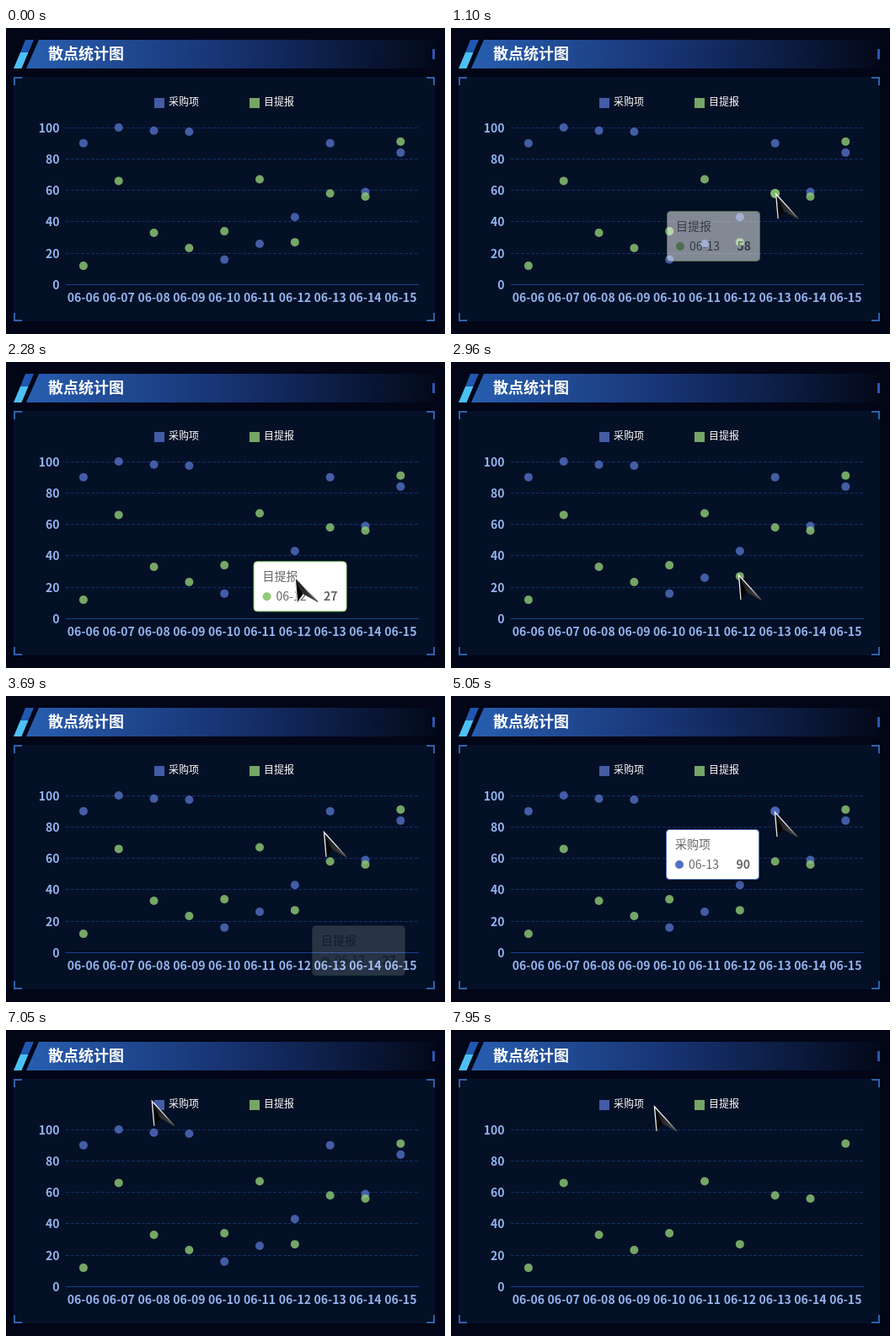
Write an HTML page that moves like this. It is 521 by 363 pixels and loops after 8000 ms.

```html
<!DOCTYPE html>
<html lang="zh">
<head>
<meta charset="utf-8">
<style>
  html, body { margin: 0; width: 100%; height: 100%; overflow: hidden; background: #020617; }
  svg { display: block; width: 521px; height: 363px; font-family: "Noto Sans CJK SC", "Noto Sans CJK", "Noto Sans", sans-serif; }
  .title { font: bold 18px "Noto Sans CJK SC", "Noto Sans CJK", sans-serif; fill: #fff; }
  .legend { font-size: 12px; fill: #fff; }
  .axis { font-size: 14px; font-weight: bold; fill: #94b5ef; }
  .tip { font-size: 14px; fill: #666; filter: drop-shadow(1px 2px 5px rgba(0,0,0,.2)); }
</style>
</head>
<body>
<svg viewBox="0 0 521 363">
  <defs>
    <linearGradient id="bar">
      <stop offset="0" stop-color="#285eb0"/>
      <stop offset=".5" stop-color="#173270"/>
      <stop offset="1" stop-color="#030919"/>
    </linearGradient>
    <linearGradient id="edge" x1="0" y1="0" x2="1" y2="1">
      <stop offset="0" stop-color="#fff"/>
      <stop offset=".55" stop-color="#ddd"/>
      <stop offset="1" stop-color="#444"/>
    </linearGradient>
    <linearGradient id="facet" x1="0" y1="0" x2="1" y2="1">
      <stop offset="0" stop-color="#0c0c0c"/>
      <stop offset="1" stop-color="#484848"/>
    </linearGradient>
  </defs>
  <path d="M23 14H33L26.5 29H17Z" fill="#2057b0"/>
  <path d="M17 29H26.5L18.5 48H9Z" fill="#4dc0f3"/>
  <path d="M39 14H509V48H24Z" fill="url(#bar)"/>
  <path d="M506 25h3v12h-3z" fill="#2c55b3"/>
  <text class="title" x="50" y="37">散点统计图</text>
  <path d="M9 58H509V348H9Z" fill="#041026"/>
  <path d="M10 68V59H19M499 59H508V68M508 338V347H499M19 347H10V338" fill="none" stroke="#2d62ac" stroke-width="2"/>
  <g id="chart"></g>
  <g id="tip" class="tip">
    <rect x=".5" y=".5" width="110" height="59" rx="4" fill="#fff"/>
    <text id="tipName" x="11" y="23"></text>
    <circle id="tipMark" cx="16" cy="42" r="5"/>
    <text id="tipDate" x="27" y="47"></text>
    <text id="tipValue" x="100" y="47" text-anchor="end" font-weight="bold"></text>
  </g>
  <g id="cursor">
    <path d="M0 0L3 31L10 21Z" fill="#050505"/>
    <path d="M0 0L10 21L28 31Z" fill="url(#facet)"/>
    <path d="M3 30L.5 .8L27 30" fill="none" stroke="url(#edge)" stroke-width="1.3"/>
  </g>
</svg>
<script>
const LOOP = 8000;
const $ = id => document.getElementById(id);
const chart = $('chart');
const series = [
  { name: '采购项', color: '#5470c6', legendX: 176, values: [90, 100, 98, 97.3, 16, 26, 43, 90, 59, 84] },
  { name: '目提报', color: '#91cc75', legendX: 289, values: [12, 66, 33, 23.3, 34, 67, 27, 58, 56, 91] }
];
const dates = series[0].values.map((_, i) => '06-' + String(i + 6).padStart(2, '0'));
const px = i => 71 + 41.82 * (i + .5);
const py = v => 304.5 - 1.865 * v;

function add(tag, attrs, text) {
  const el = document.createElementNS('http://www.w3.org/2000/svg', tag);
  set(el, attrs);
  if (text) el.textContent = text;
  return chart.appendChild(el);
}
function set(el, attrs) {
  for (const key in attrs) el.setAttribute(key, attrs[key]);
}

for (let v = 0; v <= 100; v += 20) {
  const y = Math.floor(py(v)) + .5;
  add('path', { d: `M71 ${y}H490`, stroke: v ? '#102f69' : '#1a4190', 'stroke-dasharray': v ? '4 2' : 'none' });
  add('text', { class: 'axis', x: 63.5, y: y + 5, 'text-anchor': 'end' }, String(v));
}
dates.forEach((d, i) => add('text', { class: 'axis', x: px(i), y: 325, 'text-anchor': 'middle' }, d));
for (const s of series) {
  add('rect', { x: s.legendX, y: 83, width: 12, height: 12, fill: s.color, opacity: .8 });
  add('text', { class: 'legend', x: s.legendX + 17, y: 92 }, s.name);
  s.dots = s.values.map((v, i) => add('circle', { cx: px(i), cy: py(v), fill: s.color }));
}

// Cursor tip: time, x, y
const path = [
  [130, 232, 284], [450, 310, 215], [750, 386, 144], [960, 385, 196], [1730, 386, 197],
  [1930, 366, 208], [2240, 343, 254], [2560, 340, 256], [2760, 311, 262], [2960, 341, 252],
  [3450, 341, 252], [3690, 377, 161], [4030, 384, 137], [5380, 384, 137], [5900, 94, 204],
  [6160, 121, 196], [6980, 173, 84], [7810, 171, 79], [7950, 241, 90], [LOOP, 241, 90]
];
// Tooltips: shown from start to end; each glides from the previous place
const tips = [
  { start: 1000, end: 2240, s: 1, i: 7, x: 256, y: 217 },
  { start: 2240, end: 2700, s: 1, i: 6, x: 363, y: 272 },
  { start: 3050, end: 3520, s: 1, i: 6, x: 363, y: 272 },
  { start: 4560, end: 5480, s: 0, i: 7, x: 255, y: 158 }
];
const FADE = 200, GLIDE = 400;
const clamp = x => Math.max(0, Math.min(1, x));
const mix = (a, b, k) => a + (b - a) * k;

function drawCursor(t) {
  const n = path.findIndex(p => p[0] > t);
  $('cursor').style.display = n > 0 ? '' : 'none';
  if (n < 1) return;
  const [t0, x0, y0] = path[n - 1], [t1, x1, y1] = path[n];
  const k = (t - t0) / (t1 - t0);
  set($('cursor'), { transform: `translate(${mix(x0, x1, k)} ${mix(y0, y1, k)})` });
}

function drawTip(t) {
  const n = tips.findLastIndex(tip => tip.start <= t);
  const tip = tips[n], prev = tips[n - 1] || tip;
  $('tip').style.display = tip && t < tip.end + FADE ? '' : 'none';
  if (!tip) return null;
  const glide = 1 - (1 - clamp((t - tip.start) / GLIDE)) ** 4;
  const fadeIn = prev.end === tip.start ? 1 : clamp((t - tip.start) / FADE);
  const fadeOut = tips[n + 1]?.start === tip.end ? 1 : 1 - clamp((t - tip.end) / FADE);
  set($('tip'), {
    transform: `translate(${mix(prev.x, tip.x, glide)} ${mix(prev.y, tip.y, glide)})`,
    opacity: Math.min(fadeIn, fadeOut)
  });
  const { name, color, values } = series[tip.s];
  $('tipName').textContent = name;
  $('tipDate').textContent = dates[tip.i];
  $('tipValue').textContent = values[tip.i];
  set($('tipMark'), { fill: color });
  set($('tip').firstElementChild, { stroke: color });
  return t < tip.end ? tip : null;
}

function draw(t) {
  drawCursor(t);
  const hover = drawTip(t);
  const shown = 1 - clamp((t - 7350) / 200);
  series.forEach((s, n) => s.dots.forEach((dot, i) => {
    const k = n ? 1 : shown;
    const hovered = hover && hover.s === n && hover.i === i;
    set(dot, { r: (hovered ? 5.6 : 5) * k, opacity: (hovered ? .9 : .8) * k });
  }));
}

const begin = performance.now();
function tick() {
  draw((performance.now() - begin) % LOOP);
  requestAnimationFrame(tick);
}
tick();
</script>
</body>
</html>
```
